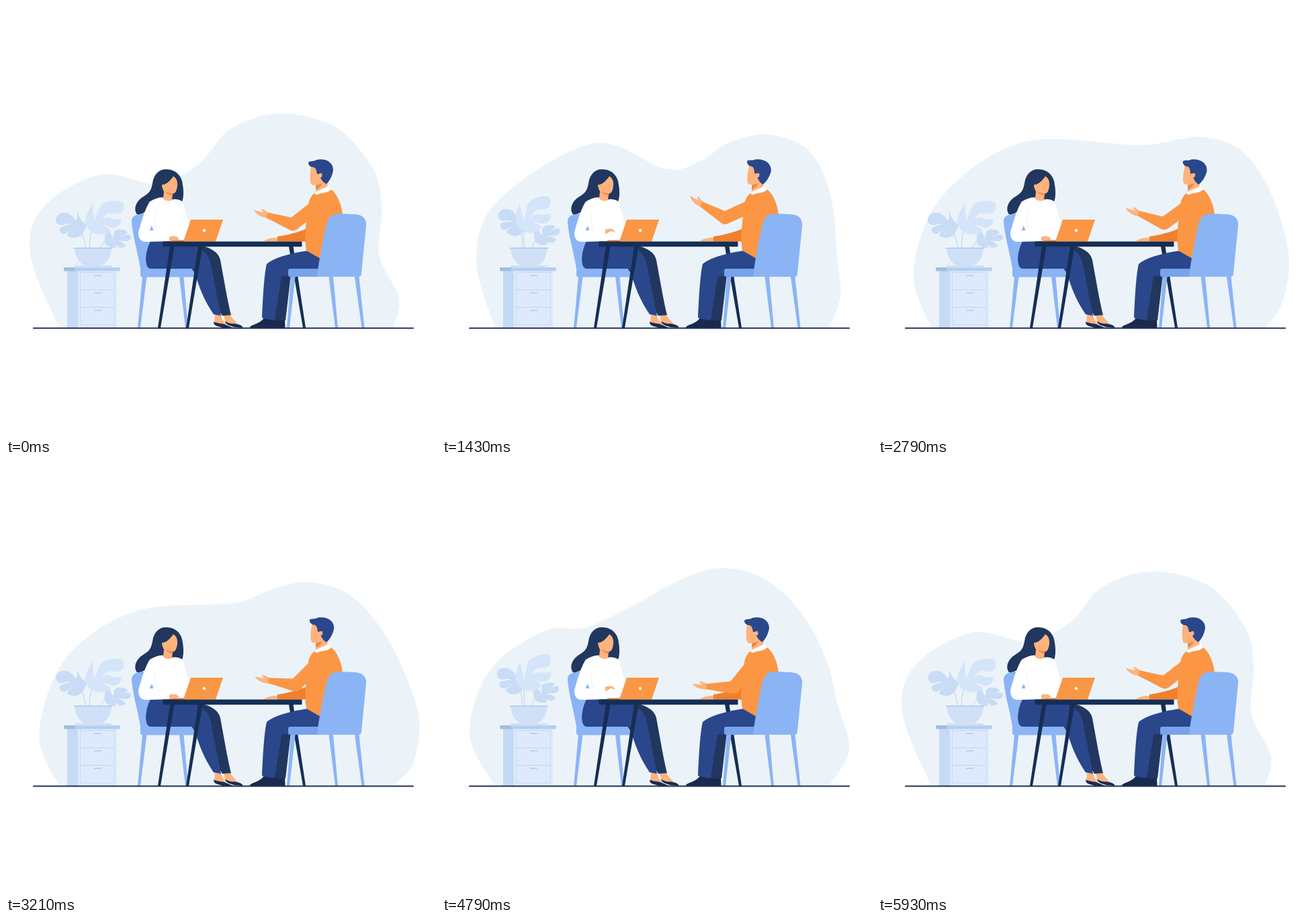
An HTML page with a canvas that plays this animation: 640x640 px, repeating every 6070 ms.

```html
<!DOCTYPE html>
<html lang="en">
<head>
<meta charset="utf-8">
<title>Meeting at a table</title>
<style>
  html, body { margin: 0; width: 100%; height: 100%; overflow: hidden; background: #fff; }
  canvas { display: block; width: 640px; height: 640px; }
</style>
</head>
<body>
<canvas id="stage" width="640" height="640"></canvas>
<script>
const ctx = document.getElementById('stage').getContext('2d');

const LOOP = 6070, FIRST_HOLD = 290, STEP = 71.4, LAST_STEP = 80;

const C = {
  blob: '#ebf3f9', line: '#1f2f55', chair: '#8bb4f5', seat: '#78a3ea',
  navy: '#2a478c', dark: '#21375f', table: '#162e54', shoe: '#1a2a4e',
  orange: '#fb9645', deepOrange: '#f17f2b', skin: '#ffb27c', skinShade: '#e88a4e',
  side: '#c5daf4', front: '#deeafc', trim: '#bdd5f4',
  leaf: '#c8dcf5', paleLeaf: '#d4e4f9', pot: '#cfe0f7'
};

// Drawing helpers
const fill = (color, d) => { ctx.fillStyle = color; ctx.fill(new Path2D(d)); };
const stroke = (color, width, d) => {
  ctx.strokeStyle = color;
  ctx.lineWidth = width;
  ctx.stroke(new Path2D(d));
};
const rect = (color, x, y, w, h, r = 0) => {
  ctx.fillStyle = color;
  ctx.beginPath();
  ctx.roundRect(x, y, w, h, r);
  ctx.fill();
};
const dot = (color, x, y, r) => {
  ctx.fillStyle = color;
  ctx.beginPath();
  ctx.arc(x, y, r, 0, Math.PI * 2);
  ctx.fill();
};
const leg = (color, top, bottom, y, w = 6.5) =>
  fill(color, `M${top},${y}h${w}L${bottom + 4},479h-4Z`);
const rad = deg => deg * Math.PI / 180;
const turned = (x, y, deg, draw) => {
  ctx.save();
  ctx.translate(x, y);
  ctx.rotate(rad(deg));
  ctx.translate(-x, -y);
  draw();
  ctx.restore();
};

// Easing helpers
const ease = x => (1 - Math.cos(Math.PI * Math.min(1, Math.max(0, x)))) / 2;
const bump = (s, peak, half) => ease(1 - Math.abs(s - peak) / half);
const sway = (s, peak, half) => bump(s, peak, half) + bump(s, peak + 44, half);

// Outline of the backdrop at a few moments, left to right
const BLOB_TIMES = [0, 11, 24, 36, 50, 64, 80];
const BLOB = [
  '36,370 56,299 140,251 226,265 288,234 334,183 407,160 490,180 546,242 559,300 556,372 585,435',
  '43,372 60,309 170,235 268,246 312,233 357,197 437,176 515,195 553,240 564,290 567,360 589,430',
  '58,385 105,270 272,178 388,242 450,229 484,210 517,203 556,219 582,262 599,318 605,375 596,435',
  '53,395 95,284 215,203 385,207 424,203 450,198 484,195 533,210 573,255 600,320 612,383 601,443',
  '44,412 80,297 165,242 252,216 313,181 355,157 404,145 471,165 530,222 582,296 618,376 613,448',
  '41,402 72,306 152,249 215,243 290,208 345,177 411,155 478,170 535,222 572,292 588,355 606,425'
].map(row => row.split(/[ ,]/).map(Number));
BLOB.push(BLOB[0]);

function blobPoints(s) {
  let i = 0;
  while (i < BLOB.length - 2 && s >= BLOB_TIMES[i + 1]) i++;
  const span = BLOB_TIMES[i + 1] - BLOB_TIMES[i];
  const x = (s - BLOB_TIMES[i]) / span;
  // The shape rests at every second pose and passes through the others.
  const slope = (k, j) => k % 2
    ? (BLOB[k + 1][j] - BLOB[k - 1][j]) / (BLOB_TIMES[k + 1] - BLOB_TIMES[k - 1]) * span
    : 0;
  const values = BLOB[i].map((a, j) => {
    const b = BLOB[i + 1][j], x2 = x * x, x3 = x2 * x;
    return a + (b - a) * (3 * x2 - 2 * x3)
      + slope(i, j) * (x3 - 2 * x2 + x) + slope(i + 1, j) * (x3 - x2);
  });
  const points = [[79, 479]];
  for (let j = 0; j < values.length; j += 2) points.push([values[j], values[j + 1]]);
  points.push([576, 479]);
  return points;
}

function drawBlob(s) {
  const p = blobPoints(s);
  const at = i => p[Math.max(0, Math.min(p.length - 1, i))];
  const handle = (i, sign) => [0, 1].map(k => at(i)[k] + sign * (at(i + 1)[k] - at(i - 1)[k]) / 6);
  ctx.beginPath();
  ctx.moveTo(...p[0]);
  for (let i = 0; i < p.length - 1; i++)
    ctx.bezierCurveTo(...handle(i, 1), ...handle(i + 1, -1), ...p[i + 1]);
  ctx.closePath();
  ctx.fillStyle = C.blob;
  ctx.fill();
}

function drawPlant(s) {
  turned(120, 364, 11.5 * sway(s, 15, 16), () => {
    stroke(C.leaf, 1.4, 'M96,323Q116,330 119,364');
    fill(C.leaf, 'M120,326C114,320 109,317 106,306C105,311 107,317 104,319C100,314 96,309 90,308C80,307 74,312 74,319C75,324 79,327 84,326C90,324 94,323 97,325C92,325 86,327 81,330C78,334 82,340 88,339C93,337 97,332 101,331C97,334 92,337 91,341C94,346 106,347 112,341C117,336 118,331 120,326Z');
  });
  turned(138, 384, -15 * sway(s, 20, 16), () => {
    stroke(C.leaf, 1.4, 'M152,346Q142,352 138,368');
    fill(C.leaf, 'M147,352C147,345 145,338 154,332C155,338 157,343 160,345C160,340 161,334 165,333C172,332 179,333 181,337C178,341 171,342 167,346C173,342 181,339 185,341C188,346 184,349 180,350C175,350 170,348 166,349C171,350 176,353 178,357C174,361 166,361 162,354C163,357 164,359 163,360C157,361 150,358 147,352Z');
  });
  turned(124, 364, -11.5 * sway(s, 17.5, 18), () => {
    stroke(C.leaf, 1.4, 'M130,326Q124,344 124,364');
    fill(C.paleLeaf, 'M122,331C116,322 117,312 130,293C129,302 130,312 131,320C134,313 137,305 141,297C148,290 164,288 174,292C177,299 175,308 168,309C162,310 155,307 151,309C146,312 143,316 141,318C146,314 152,313 157,316C164,318 168,318 172,317C172,325 166,331 158,330C152,328 147,325 143,326C148,327 152,330 155,334C148,342 132,343 122,331Z');
  });
  fill(C.pot, 'M102,360H157C156,375 148,386 138,387H121C111,386 103,375 102,360Z');
  rect(C.pot, 102, 386, 55, 3.5, 1.5);
  stroke('#9dc2f3', 1.2, 'M101,360.4H158');
}

function drawCabinet() {
  rect(C.front, 106, 394, 59, 85);
  rect(C.side, 91, 394, 16, 85);
  rect('#b5cff0', 90, 389, 80, 5.5, 1);
  rect('#a0bfe0', 86, 389, 17, 5.5, 1);
  for (const y of [396, 422, 448]) {
    stroke(C.trim, 0.8, `M110.5,${y + 0.5}h51v26h-51Z`);
    rect('#b5cff0', 131, y + 4.2, 11, 1.8, 0.9);
  }
}

function drawWoman(s) {
  fill(C.chair, 'M187,322C186,314 193,309 205,309H228L232,391H200C197,370 189,345 187,322Z');
  rect(C.chair, 200, 390, 84, 13.5, 3);
  leg(C.chair, 203, 196, 403);
  leg(C.chair, 258, 267, 403);

  fill(C.skin, 'M311,460H320L322,467L328,474L310,472Z');
  fill(C.skin, 'M324,460H334C337,466 342,470 346,474L327,471Z');
  fill(C.shoe, 'M309,470C316,473 322,472 326,474L338,479H322C316,476 309,477 309,470Z');
  fill(C.shoe, 'M326,469C332,474 340,472 346,474C350,475 353,477 352,479L340,478C334,476 327,475 326,469Z');
  fill(C.dark, 'M250,350L290,356C306,361 316,366 319,378C324,405 330,440 335,460L322,461Z');
  fill(C.navy, 'M215,350H262C285,356 300,366 304,380L320,461L309,459C296,440 285,415 280,391H215C206,390 206,368 215,350Z');

  fill(C.dark, 'M218,264C220,250 228,243 238,243C254,243 262,254 263,266C265,278 264,286 262,292L250,290L234,288C226,292 206,312 195,310C189,302 194,290 204,284C214,278 216,274 218,264Z');
  fill('#fff', 'M234,285C228,284 220,288 214,291C208,300 202,318 197,337C197,347 201,351 209,351L247,350L271,345L273,323C268,310 265,298 263,291C257,287 250,287 247,288C243,291 237,290 234,285Z');
  fill(C.skin, 'M232,266C239,266 244,260 249,253.5C253,255 256,261 255,268C254,275 252,279 249,279H248L247,289C243,291 237,290 234,287L235,276C233,272 232,269 232,266Z');
  fill(C.skinShade, 'M236,276Q242,279 249,279L248,282Q241,281 236,276Z');
  fill(C.chair, 'M213.5,334L217,327L219.5,334Z');
  stroke('#e8f0f8', 0.9, 'M223,308C221,320 222,330 228,338');

  rect('#d9752f', 246, 348.6, 20, 2.4);
  fill(C.orange, 'M275,318H323L312,350.5H264Z');
  dot('#fff', 295, 334, 2.3);

  const lift = 12 * sway(s, 20, 16), curl = lift / 4;
  ctx.save();
  ctx.translate(0, -lift);
  fill(C.skin, `M243,344C247,342 253,342 256,345L258,${347 + curl / 2}Q254,${349 - curl} 251,${349 - curl}Q247,349 243,350Z`);
  ctx.restore();
}

function drawTable() {
  rect(C.table, 233.5, 350.6, 207, 7.6, 1);
  leg(C.table, 244, 226, 358);
  leg(C.table, 286, 268, 358);
}

function armRaise(s) {
  if (s < 24) return ease(s / 24);
  if (s < 66) return 1 - 1.75 * ease((s - 24) / 24);
  return -0.75 * (1 - ease((s - 66) / 14));
}

function drawNearArm(s) {
  const u = armRaise(s);
  const reach = (x, y, deg, len) =>
    [x + len * Math.cos(rad(deg)), y + len * Math.sin(rad(deg))];
  const shoulder = [464, 296];
  const elbow = reach(...shoulder, 142 + 17 * u, 47);
  const bend = 199.7 + u * (u > 0 ? 13 : 24);
  const wrist = reach(...elbow, bend, 41);

  ctx.save();
  ctx.translate(...wrist);
  ctx.rotate(rad(u * (u > 0 ? 21 : 12)));
  fill(C.skin, 'M2,-4C-3,-6 -5,-9 -8,-9C-9,-7 -6,-5 -5,-4C-10,-4 -16,-7 -19,-7C-19,-4 -13,0 -9,2C-5,4 -2,4 1,4Z');
  ctx.restore();

  ctx.lineCap = ctx.lineJoin = 'round';
  stroke(C.orange, 19, `M${shoulder}L${elbow}`);
  ctx.lineCap = 'butt';
  const corners = [
    reach(...elbow, bend + 90, 9.5), reach(...wrist, bend + 90, 4),
    reach(...wrist, bend - 90, 4), reach(...elbow, bend - 90, 9.5)
  ];
  fill(C.orange, `M${corners.join('L')}Z`);
}

function drawMan(s) {
  leg(C.table, 421, 442, 358);
  fill(C.shoe, 'M400,464L415,466L415.5,479H399Z');
  fill(C.dark, 'M409,402L424,400L416,468H399Z');
  fill(C.shoe, 'M384,464L400,467V479H363C363,474 378,474 384,464Z');
  fill(C.navy, 'M468,363C440,363 400,373 388,384C384,400 382,440 381,464Q390,468 400,467L410,403L430,400L470,392Z');
  rect(C.seat, 420, 391, 60, 12, 3);
  leg(C.chair, 424, 418, 403);
  leg(C.chair, 480.5, 490, 403);
  leg(C.chair, 519, 529.5, 403);

  fill(C.skin, 'M384,349.5C392,345 398,345 405,345V350.3H384Z');
  fill(C.deepOrange, 'M404,343C418,341 435,337 448,331V350.5H404Z');
  fill(C.skin, 'M461,258H477L479,270C472,275 465,277 461,277Z');
  fill(C.skinShade, 'M461,267L471,263C468,270 464,272 461,273Z');
  fill(C.orange, 'M461,277C470,280 480,278 484,273C492,279 499,293 501,310L480,330L468,376L447,364C444,345 446,330 447,322L450,295C452,285 456,281 461,277Z');
  fill('#fff', 'M459,279C463,274 472,273 480,267L484,273C478,277 470,278 462,281Z');

  turned(470, 270, 9 * bump(s, 26, 24), () => {
    fill(C.skin, 'M454,239C452,250 452,262 455,266C459,268 466,266 470,264L474,245L460,236Z');
    fill(C.navy, 'M450,233C452,230 458,232 462,229C475,226 487,232 487,244C486,252 482,260 477,265C473,263 469,259 468,255C472,250 470,247 466,250H463C462,244 461,241 458,240C453,240 450,237 450,233Z');
    dot(C.skin, 467.5, 252.2, 3);
  });

  drawNearArm(s);
  fill(C.chair, 'M463,401C466,380 472,345 477,325C480,313 487,308 497,309L520,310C532,311 537,318 536,327L529,398C529,402 527,403 524,403H466Q463,403 463,401Z');
}

function draw(now) {
  const t = now % LOOP;
  const s = t < FIRST_HOLD ? 0
    : Math.min(LAST_STEP, 1 + Math.floor((t - FIRST_HOLD + 5) / STEP));
  ctx.fillStyle = '#fff';
  ctx.fillRect(0, 0, 640, 640);
  drawBlob(s);
  drawCabinet();
  drawPlant(s);
  drawWoman(s);
  drawMan(s);
  drawTable();
  rect(C.line, 40, 478.6, 567, 2, 1);
}

const start = performance.now();
function tick() {
  draw(performance.now() - start);
  requestAnimationFrame(tick);
}
tick();
</script>
</body>
</html>
```
